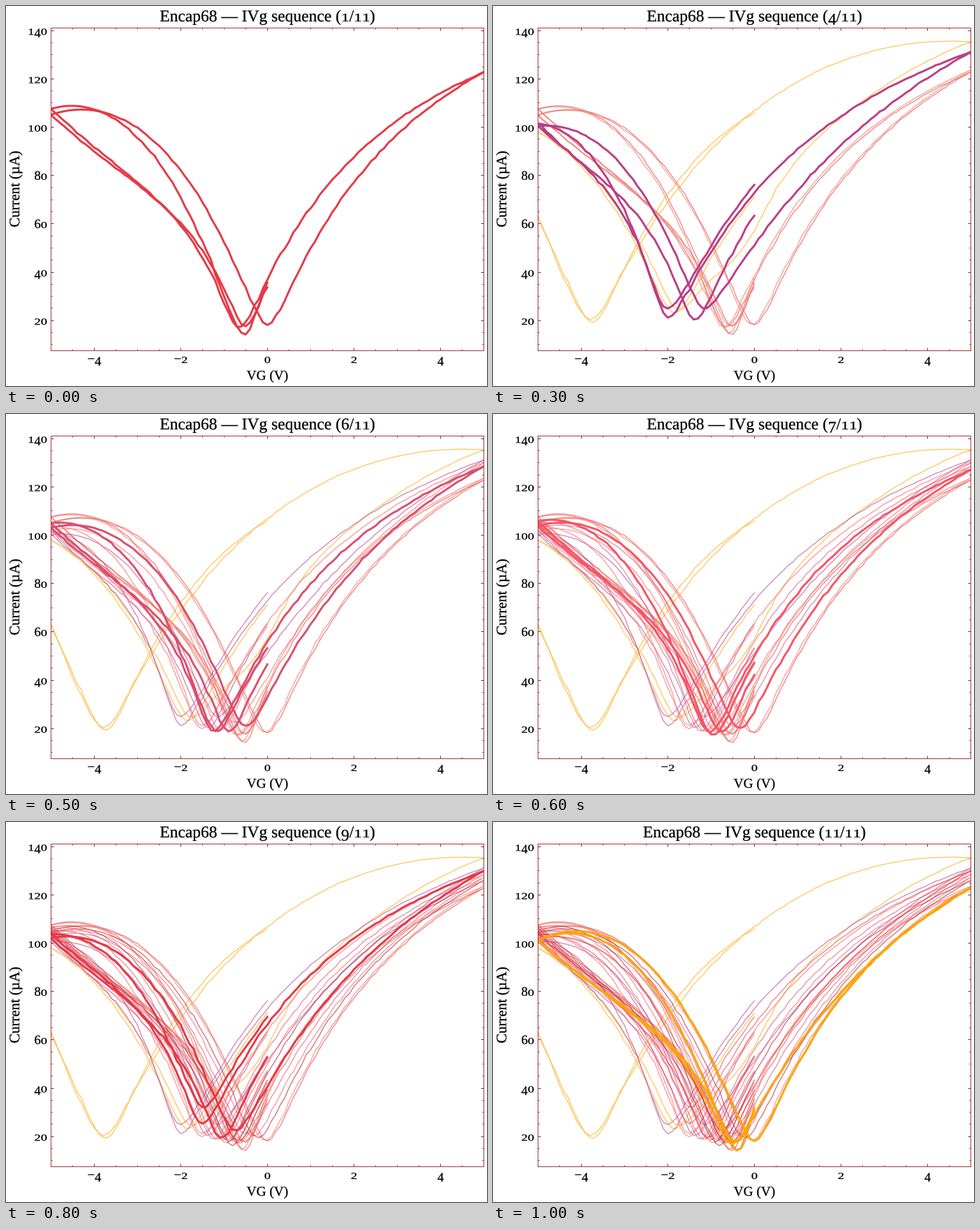
Animation, 689 px wide and 544 px high, one loop 1100 ms. Source, as a matplotlib script:

```python
import numpy as np
import matplotlib.pyplot as plt
from matplotlib.animation import FuncAnimation
from matplotlib.patches import PathPatch
from matplotlib.path import Path
from matplotlib.textpath import TextPath
from matplotlib.ticker import MultipleLocator
from matplotlib.transforms import Affine2D

W, H, DPI = 689, 544, 100
LEFT, RIGHT, TOP, BOTTOM = 64.3, 684.3, 30.7, 492.7
X_ZERO, X_UNIT = 374.5, 62
Y_TWENTY, Y_UNIT = 449.7, 415 / 120
FONT = {"family": "Liberation Serif"}
SHORT = (0.3, 0)


def soft(u, w=0.25):
    return np.hypot(u, w) - w


def rise(u, span, shape):
    """Flank from 0 at the minimum to 1 at its far end."""
    steep, bow = shape
    t = soft(u) / soft(span)
    return (1 + steep) * t / (1 + steep * t) + bow * t * (1 - t)


def branch(x, v, low, y_left, x_right, y_right, left, right, shoulder=0):
    y = np.where(x < v,
                 low + (y_left - low) * rise(x - v, v + 5, left),
                 low + (y_right - low) * rise(x - v, x_right - v, right))
    return y - shoulder * np.exp(-((x + 0.3) / 0.55) ** 2 / 2)


def loop(shift, aged=0, lift=0):
    """Four branches whose minima and ends follow the voltage shift."""
    c = max(shift, 0)
    top = 122.7 + 9.5 * (1 - np.exp(-c / 0.65))
    a = 105 - 3.5 * c - 4 * aged
    b = 107.5 - 4.5 * c - 6.5 * aged
    start = 33.5 + 22 * shift
    end = 35.5 + 30 * shift + 0.7 * lift
    v1, v2 = -0.5 - 0.65 * shift, -0.85 * c
    v3, v4 = -0.65 - shift, -0.52 - 1.1 * shift

    def sag(v):
        return 2.4, -0.58 - 0.15 * v

    def hump(v):
        return 1, 0.83 + 0.2 * v + 0.15 * aged

    return [
        (v1, 17.5 + 2 * c, a, 0, start, sag(v1), SHORT),
        (v2, 18 + 5 * c, a, 5, top, hump(v2), (1.2 + 0.35 * v2, 0)),
        (v3, 17 + 3 * c + lift / 2, b, 5, top, sag(v3), (1.5 - 0.6 * aged, 0)),
        (v4, 14 + 8 * c + lift, b, 0, end, hump(v4), SHORT),
    ]


def stray():
    """The one sweep with its minima far from zero."""
    a, b, top = 63, 98, 135.2
    flat, mid = (0, 0), (0.8, 0.15)
    return [
        (-3.72, 19.2, a, 0, 105.8, flat, mid),
        (-3.79, 20.2, a, 5, top, flat, (1.4, 0.5)),
        (-1.75, 24.8, b, 5, top, mid, mid, 11),
        (-1.85, 23, b, 0, 71, mid, SHORT),
    ]


def trace(branches, rng):
    """Gate path 0 -> -5 -> 5 -> -5 -> 0 with a little voltage jitter."""
    xs, ys = [], []
    for i, spec in enumerate(branches):
        x = np.linspace(-5, spec[3], 10 * (spec[3] + 5) + 1)
        y = branch(x, *spec)
        jitter = np.clip(rng.normal(0, 0.012, len(x)), -0.025, 0.025)
        jitter[[0, -1]] = 0
        y += np.gradient(y, x) * jitter
        step = 1 if i % 2 else -1
        xs.append(x[::step])
        ys.append(y[::step])
    return np.concatenate(xs), np.concatenate(ys)


# The shift relaxes sweep by sweep after the stray one.
relaxing = ["#bb3e85", "#ff5a5f", "#d8506f", "#f65566", "#b2182b"]
SWEEPS = [("#e63946", loop(0)), ("#f4694a", loop(0.06)), ("#ffa500", stray())]
SWEEPS += [(c, loop(1.35 * np.exp(-i / 2.4))) for i, c in enumerate(relaxing)]
SWEEPS += [("#e63946", loop(0.87, lift=11)),
           ("#b5388f", loop(-0.16, aged=1)),
           ("#ffa500", loop(-0.13, aged=1))]


def advance(s, size):
    def edge(t):
        return TextPath((0, 0), t, size=size, prop=FONT).get_extents().x1
    return edge(s + "|") - edge("|")


def lettering(s, size, x, y, align=0.5, angle=0):
    """Text outline with old-style figures, baseline at pixel (x, y)."""
    parts = []
    for i, ch in enumerate(s):
        if ch == " ":
            continue
        place = Affine2D()
        if ch in "012":
            place.scale(1, 0.71)
        drop = 0.2 * size if ch in "34579" else 0
        place.translate(advance(s[:i], size), -drop)
        glyph = TextPath((0, 0), ch, size=size, prop=FONT)
        parts.append(Path(place.transform(glyph.vertices), glyph.codes))
    move = Affine2D().translate(-align * advance(s, size), 0)
    move.rotate_deg(angle).translate(x, H - y)
    return Path.make_compound_path(*parts).transformed(move)


def heading(n):
    text = f"Encap68 — IVg sequence ({n}/{len(SWEEPS)})"
    return lettering(text, 23.5, X_ZERO, 22)


fig = plt.figure(figsize=(W / DPI, H / DPI), dpi=DPI, facecolor="white")
pixels = Affine2D().scale(1 / DPI) + fig.dpi_scale_trans


def add_text(path):
    return fig.add_artist(PathPatch(path, fc="black", ec="black", lw=0.2,
                                    transform=pixels))


ax = fig.add_axes([LEFT / W, 1 - BOTTOM / H, (RIGHT - LEFT) / W, (BOTTOM - TOP) / H])
ax.set_xlim(-5, 5)
ax.set_ylim(20 - (BOTTOM - Y_TWENTY) / Y_UNIT, 20 + (Y_TWENTY - TOP) / Y_UNIT)
for axis, major, minor in ((ax.xaxis, 2, 0.5), (ax.yaxis, 20, 5)):
    axis.set_major_locator(MultipleLocator(major))
    axis.set_minor_locator(MultipleLocator(minor))
ax.tick_params(which="both", direction="in", top=True, right=True, width=0.6,
               color="#3a1a1a", labelbottom=False, labelleft=False)
ax.tick_params(which="major", length=3)
ax.tick_params(which="minor", length=1.6)
for spine in ax.spines.values():
    spine.set(color="#a5343a", linewidth=0.7)

for v in range(-4, 5, 2):
    add_text(lettering(str(v).replace("-", "−"), 18.5, X_ZERO + X_UNIT * v, 511))
for c in range(20, 141, 20):
    add_text(lettering(str(c), 18.5, 59, Y_TWENTY + 6.5 - Y_UNIT * (c - 20), align=1))
add_text(lettering("VG (V)", 19.3, X_ZERO, 535))
add_text(lettering("Current (µA)", 20.8, 19, 262, angle=90))
title = add_text(heading(1))

rng = np.random.default_rng(7)
lines = [ax.plot(*trace(branches, rng), color=color, solid_joinstyle="round")[0]
         for color, branches in SWEEPS]


def update(n):
    for i, line in enumerate(lines):
        current = i == n
        line.set(visible=i <= n, linewidth=2.1 if current else 0.95,
                 alpha=1 if current else 0.62)
    title.set_path(heading(n + 1))
    return [title, *lines]


anim = FuncAnimation(fig, update, frames=len(SWEEPS), interval=100,
                     repeat=True, repeat_delay=0, blit=False)
plt.show()
```
